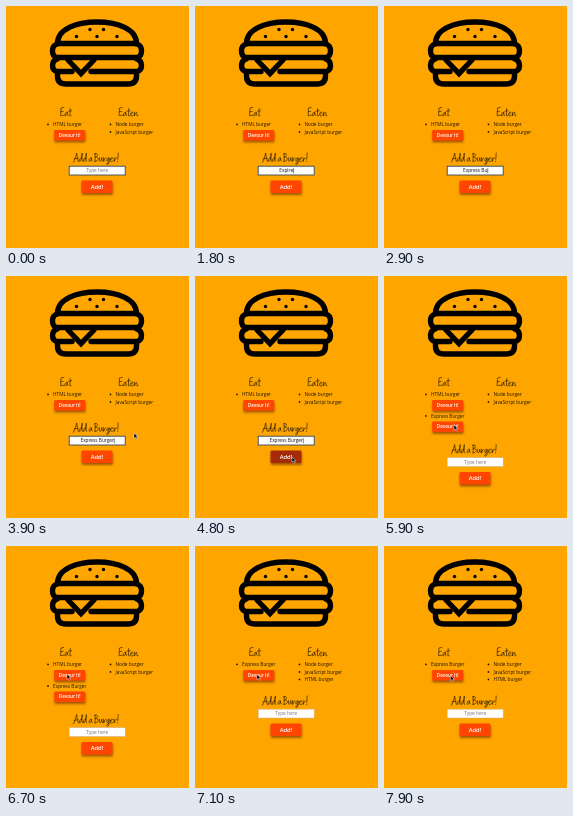
Animation, 183 px wide and 242 px high, one loop 8000 ms. Source, as an HTML page:

```html
<!DOCTYPE html>
<html lang="en">
<head>
<meta charset="utf-8">
<title>Burger list</title>
<style>
html, body { margin: 0; width: 100%; height: 100%; overflow: hidden; background: #ffa500; }
svg { display: block; width: 100vw; height: 100vh; }
text { font: 4.75px "Open Sans", "Noto Sans", sans-serif; fill: #1c1300; }
.bold { font-weight: 600; fill: #fff; text-anchor: middle; }
.mid { text-anchor: middle; }
.ink { fill: none; stroke: #2b1c00; stroke-width: .65; stroke-linecap: round; stroke-linejoin: round; }
.icon { fill: none; stroke: #000; stroke-width: 5.4; stroke-linecap: round; stroke-linejoin: round; }
</style>
</head>
<body>
<svg id="stage" viewBox="0 0 183 242">
  <defs>
    <filter id="soft" x="-20%" y="-40%" width="140%" height="200%"><feGaussianBlur stdDeviation="1.3"/></filter>
  </defs>
  <g class="icon">
    <path d="M51.5 37.5C51.5 23 70 16 91 16S130.500 23 130.500 37.500Z"/>
    <path d="M51 38C45 40 45 50 51 51.500H131C137 50 137 40 131 38"/>
    <path d="M51 53C45 55 45 64 51 65.500H66M85 65.500H131C137 64 137 55 131 53"/>
    <path d="M62 54L75 67.500L88 54" stroke-linejoin="miter"/>
    <path d="M51.500 66V70Q51.500 78 60 78H122Q130.500 78 130.500 70V66"/>
  </g>
  <g id="seeds"></g>
  <g id="heads" class="ink"></g>
  <g id="eat"></g>
  <g id="eaten"></g>
  <g id="form">
    <g id="formHead" class="ink"></g>
    <rect id="field" x="63.200" y="160.200" width="56" height="8.800" fill="#fff"/>
    <text id="value" class="mid" x="91.200" y="166.300"></text>
    <path id="caret" stroke="#000" stroke-width=".5"/>
  </g>
  <g id="cursor">
    <path d="M0 0V7.200L1.700 5.600L2.900 8.300L4.200 7.700L3 5.100H5.200Z" fill="#000" stroke="#fff" stroke-width=".6"/>
  </g>
</svg>
<script>
const LOOP = 8000;
const NS = "http://www.w3.org/2000/svg";
const $ = id => document.getElementById(id);

function add(parent, tag, attrs, label) {
  const el = document.createElementNS(NS, tag);
  for (const key in attrs) el.setAttribute(key, attrs[key]);
  if (label) el.textContent = label;
  parent.appendChild(el);
  return el;
}

// Handwritten letters: [advance, strokes], baseline at y = 0
const GLYPHS = {
  E: [4.5, "M3.800-8.600L1-8L.6-.3L4-.8M.8-4.200L3.200-4.700"],
  A: [5.4, "M0 .8Q2-3 3.200-8.500Q3.600-4 4.800 0M.6-2.600L4.600-3.300"],
  B: [4.8, "M1-8L.8 0M.2-7.600C3-9.500 5-6 1-4.300C5-5 5.500-.5.8 0"],
  a: [3.9, "M2.700-3.700C1-4.800-.4-.5.8-.1C1.800 0 2.700-2 2.700-3.600Q2.600-.2 3.700-.3"],
  b: [4, ""],
  d: [4.1, "M2.800-3.600C1-4.600-.4-.4.8 0C2-.1 2.800-3 3.300-8.400Q2.600-1 3.500 0"],
  e: [3.6, "M.5-1.900C2.500-2.200 3.200-3.900 1.900-4C.2-4-.5 0 1.500 0Q2.600 0 3.300-.9"],
  g: [3.8, "M2.800-3.600C1-4.600-.2-.8.9-.5C2-.5 2.800-2.500 2.900-3.600Q3 3 1.400 3.200Q-.3 3 1.200 1.300L3.500-.3"],
  n: [4.2, "M.5-3.900L.6 0Q1.600-3.800 2.500-3.800Q3.200-3.500 3.200-.1L4-.3"],
  r: [3.2, "M.5-3.900L.7 0Q1-3.700 2.900-3.700"],
  t: [3.4, "M1.800-7.500L1.500-.2L2.600-.3M0-4.800L3.300-5.300"],
  u: [4, "M.4-3.900Q.2 0 1.300 0Q2.500-.5 2.800-3.900Q2.600-.2 3.700-.2"],
  "!": [2, "M1.400-8.500L1-2.200M.8-.3V0"],
  " ": [1.6, ""]
};

function write(parent, label, x, y) {
  const g = add(parent, "g", { role: "img", "aria-label": label });
  for (const ch of label) {
    const [advance, d] = GLYPHS[ch];
    add(g, "path", { d, transform: `translate(${x} ${y})` });
    x += advance;
  }
}

function button(parent, x, y, w, h, label, size) {
  const g = add(parent, "g", {});
  add(g, "rect", { x: x + .3, y: y + 2, width: w, height: h, rx: 1, fill: "#713000", opacity: .65, filter: "url(#soft)" });
  const face = add(g, "rect", { x, y, width: w, height: h, rx: 1.2, fill: "#ff4500" });
  const text = add(g, "text", { class: "bold", x: x + w / 2, y: y + h / 2 + size * .36 }, label);
  text.style.fontSize = size + "px";
  return face;
}

function item(parent, x, y, label) {
  add(parent, "circle", { cx: x - 5, cy: y - 1.6, r: .85, fill: "#1c1300" });
  add(parent, "text", { x, y }, label);
}

for (const [cx, cy] of [[84, 23.5], [97.500, 23.5], [70.500, 30.5], [91, 30.5], [111, 30.5]])
  add($("seeds"), "circle", { cx, cy, r: 1.7 });
write($("heads"), "Eat", 54, 110);
write($("heads"), "Eaten", 112.500, 110);
write($("formHead"), "Add a Burger!", 67.500, 155.500);
const addFace = button($("form"), 75.500, 174.500, 31, 12.500, "Add!", 5.8);

// Each list row: a burger and its button
const rows = ["HTML burger", "Express Burger"].map((name, i) => {
  const g = add($("eat"), "g", {});
  const y = 120 + i * 21.5;
  item(g, 47, y, name);
  return { g, face: button(g, 48.2, y + 4, 31, 10.5, "Devour It!", 4.6) };
});
["Node burger", "JavaScript burger"].forEach((name, i) => item($("eaten"), 109.500, 120 + i * 7.5, name));
const moved = add($("eaten"), "g", {});
item(moved, 109.500, 135, "HTML burger");

const TYPING = [
  [0, ""], [600, "E"], [800, "Ex"], [1000, "Exp"], [1200, "Expl"], [1400, "Explr"], [1600, "Explre"],
  [1900, "Explr"], [2000, "Expl"], [2100, "Exp"], [2200, "Expr"], [2300, "Expre"], [2400, "Expres"],
  [2600, "Express"], [2800, "Express B"], [2900, "Express Bu"], [3100, "Express Bur"],
  [3200, "Express Burg"], [3400, "Express Burge"], [3800, "Express Burger"], [5000, ""]
];
const PATH = [
  [3900, 128, 157], [4200, 122, 166], [4600, 97, 181], [5000, 97, 181], [5300, 71, 151],
  [5800, 71, 151], [6300, 61, 130], [6600, 61, 128], [7000, 61, 128], [7400, 66.500, 129.500], [8000, 66.500, 129.500]
];

const ease = u => u * u * (3 - 2 * u);
const show = (el, on) => el.setAttribute("visibility", on ? "visible" : "hidden");

function pointer(t) {
  const i = Math.max(1, PATH.findIndex(p => p[0] > t));
  const [a, b] = [PATH[i - 1], PATH[i]];
  const u = ease(Math.max(0, (t - a[0]) / (b[0] - a[0])));
  return [a[1] + (b[1] - a[1]) * u, a[2] + (b[2] - a[2]) * u];
}

function draw(t) {
  const added = t >= 5000, eaten = t >= 7000, focused = t < 5000;
  const typed = TYPING.filter(s => s[0] <= t).pop()[1];

  show(rows[0].g, !eaten);
  show(rows[1].g, added);
  rows[1].g.setAttribute("transform", `translate(0 ${eaten ? -21.5 : 0})`);
  show(moved, eaten);
  $("form").setAttribute("transform", `translate(0 ${eaten ? 3 : added ? 21.5 : 0})`);

  const value = $("value");
  value.textContent = typed || "Type here";
  value.style.fill = typed ? "#111" : "#777";
  $("field").setAttribute("stroke", focused ? "#34495b" : "#c8b48c");
  $("field").setAttribute("stroke-width", focused ? .9 : .5);
  const end = 91.2 + value.getComputedTextLength() / 2 + .4;
  $("caret").setAttribute("d", `M${end} 162.200V167.300`);
  show($("caret"), focused && typed);

  addFace.setAttribute("fill", t >= 4600 && t < 5000 ? "#a52a0a" : "#ff4500");
  rows[0].face.setAttribute("fill", t >= 6800 && t < 7000 ? "#a52a0a" : "#ff4500");

  const [x, y] = pointer(t);
  $("cursor").setAttribute("transform", `translate(${x} ${y}) scale(.75)`);
  show($("cursor"), t >= 3900);
}

function tick(now) {
  draw(now % LOOP);
  requestAnimationFrame(tick);
}
requestAnimationFrame(tick);
</script>
</body>
</html>
```
